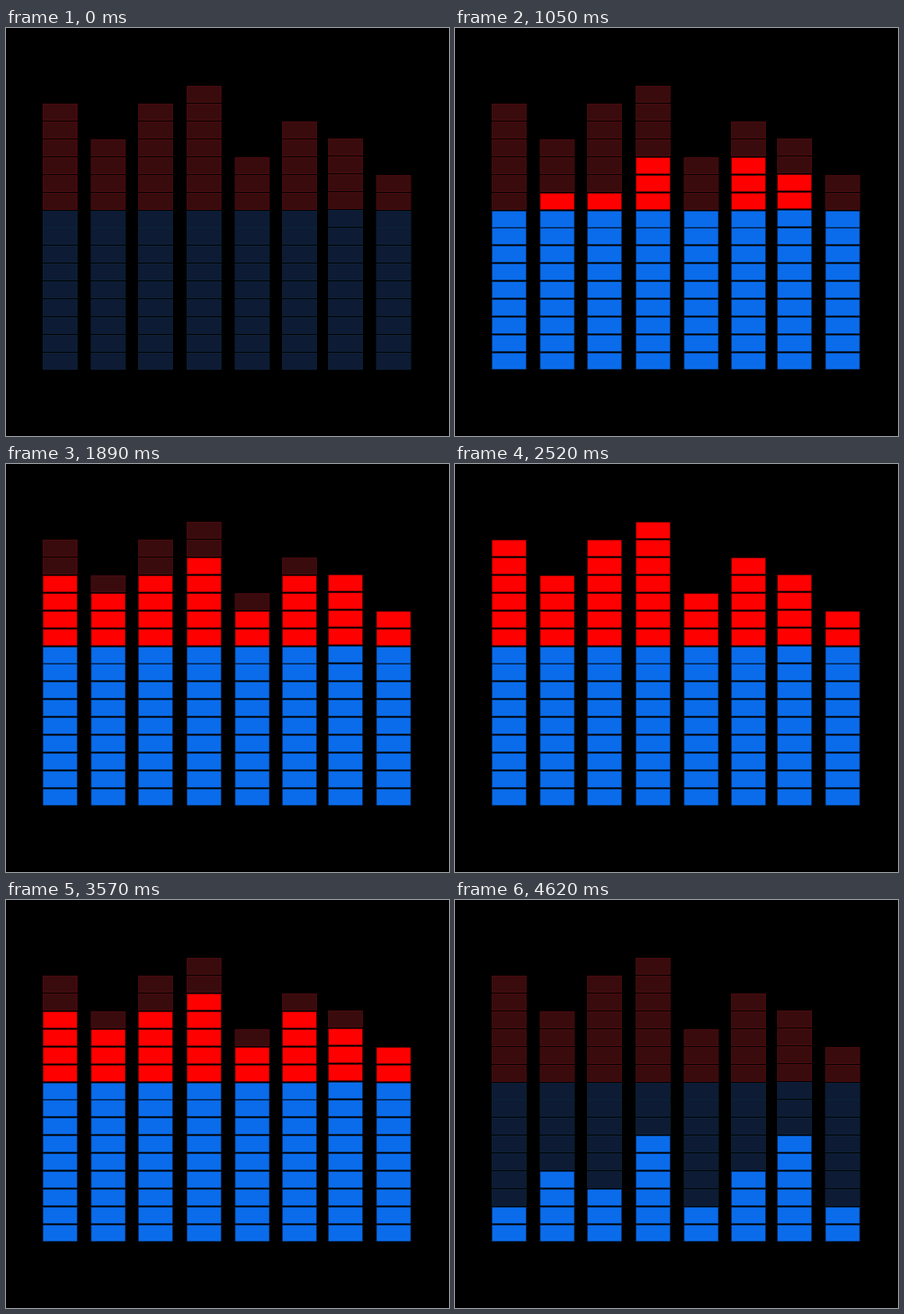
Animation of 520x480 px, one loop 4.83 s. Source, as an HTML page with a canvas:

```html
<!DOCTYPE html>
<html>
<head>
<meta charset="utf-8">
<title>Level meter</title>
<style>
html, body { margin: 0; width: 100%; height: 100%; overflow: hidden; background: #000; }
canvas { display: block; }
</style>
</head>
<body>
<canvas id="stage" width="520" height="480"></canvas>
<script>
const ctx = document.getElementById('stage').getContext('2d');
const STEP = 210, STEPS = 23;
const BLUE_ROWS = 9, PITCH = 20.93, BOTTOM = 382;
const lefts = [43, 99.5, 155, 212, 268.5, 324, 378, 434.5];
const full = [15, 13, 15, 16, 12, 14, 13, 11];
const none = full.map(() => 0);
const low = [2, 4, 3, 6, 2, 4, 6, 2];

// Lit blocks per column at key steps; the steps between are interpolated.
const keys = [
  [0, none],
  [1, low],
  [3, [6, 8, 7, 10, 8, 11, 10, 8]],
  [7, [13, 12, 13, 14, 11, 13, 13, 11]],
  [12, full],
  [16, full],
  [19, [9, 11, 10, 12, 10, 12, 12, 11]],
  [22, low],
  [23, none]
];

function level(col, step) {
  const i = keys.findIndex(k => k[0] > step);
  const [s0, a] = keys[i - 1], [s1, b] = keys[i];
  const p = (step - s0) / (s1 - s0);
  return Math.floor(a[col] + (b[col] - a[col]) * p + 1e-6);
}

function block(x, y, edge, fill, inset) {
  ctx.fillStyle = edge;
  ctx.fillRect(x, y, 41, 20);
  ctx.fillStyle = fill;
  ctx.fillRect(x + inset, y + inset, 41 - 2 * inset, 20 - 2 * inset);
}

function draw(now) {
  const step = Math.floor(now / STEP) % STEPS;
  ctx.fillStyle = '#000';
  ctx.fillRect(0, 0, 520, 480);
  lefts.forEach((x, col) => {
    const lit = level(col, step);
    const lift = col === 6 ? 0.5 : 0;
    for (let row = 0; row < full[col]; row++) {
      const y = Math.round(BOTTOM - row * PITCH - lift);
      const blue = row < BLUE_ROWS;
      if (row < lit) block(x, y, blue ? '#04244f' : '#4a0000', blue ? '#0a6ceb' : '#ff0000', 0.8);
      else block(x, y, blue ? '#0c2036' : '#480b0d', blue ? '#0d1b34' : '#3a0b0d', 1);
    }
  });
}

const start = performance.now();
function tick() {
  draw(performance.now() - start);
  requestAnimationFrame(tick);
}
tick();
</script>
</body>
</html>
```
